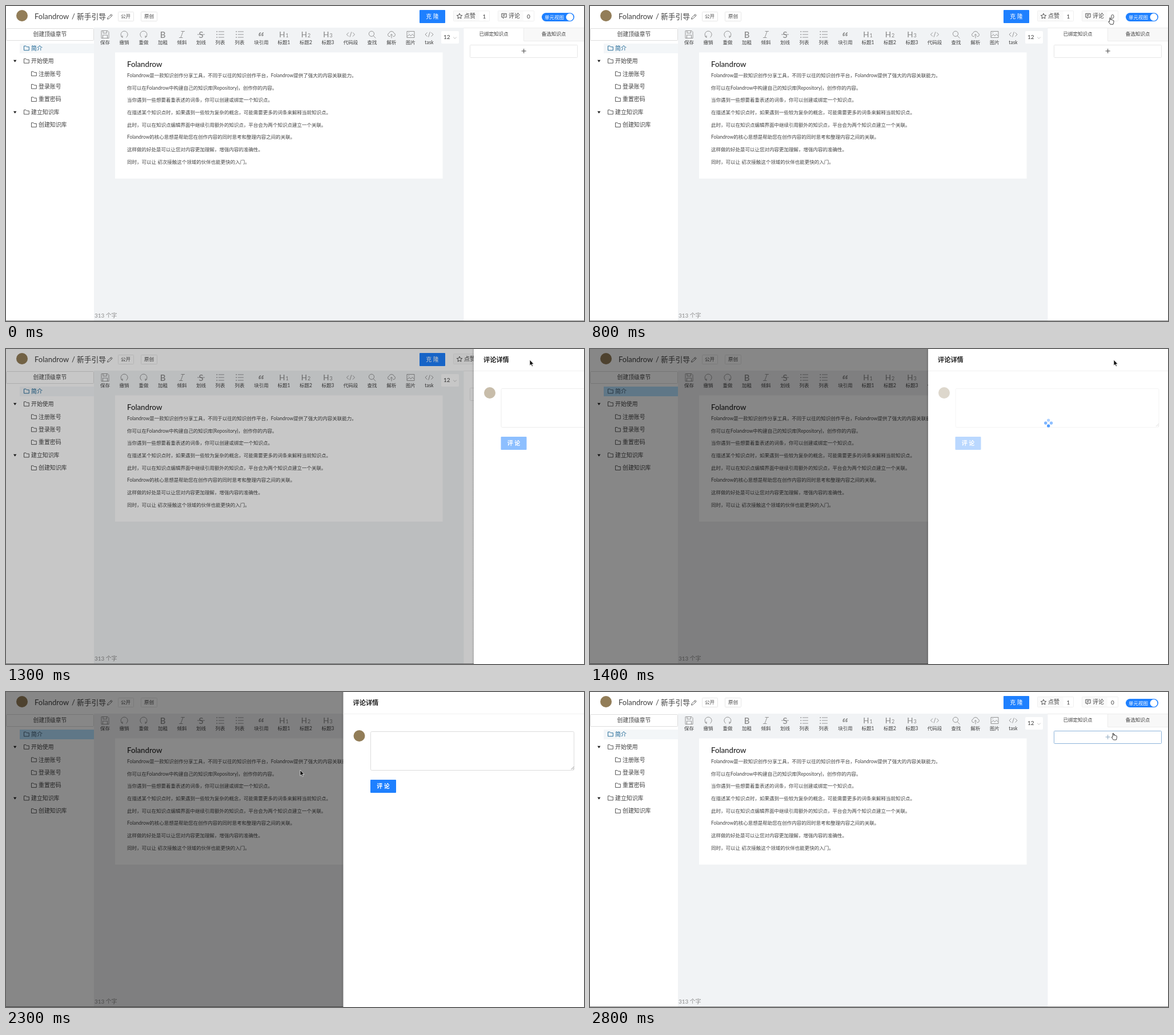
Write an HTML page that moves like this. It is 1012 by 553 pixels and loops after 2.9 s.

```html
<!DOCTYPE html>
<html>
<head>
<meta charset="utf-8">
<title>Comment drawer</title>
<style>
  html, body { margin: 0; width: 100%; height: 100%; overflow: hidden; background: #fff; }
  svg { display: block; width: 100%; height: 100%; }
  text { font-family: Lato, "Noto Sans CJK SC", "Noto Sans CJK", sans-serif; white-space: pre; }
  .icon { fill: none; stroke: #858585; stroke-width: .85; }
  .folder { fill: none; stroke: #444; stroke-width: .9; }
</style>
</head>
<body>
<svg id="stage" viewBox="0 0 1012 553"></svg>
<script>
const NS = 'http://www.w3.org/2000/svg';
const stage = document.getElementById('stage');
const BLUE = '#1e80ff', INK = '#3f3f3f', EDGE = '#e6e6e6', CREST = '#927d58';
const BRAND = 'Folandrow';
let layer = stage;

function add(tag, attrs, content) {
  const node = document.createElementNS(NS, tag);
  for (const key in attrs) node.setAttribute(key, attrs[key]);
  if (content) node.textContent = content;
  layer.appendChild(node);
  return node;
}
const rect = (x, y, right, bottom, fill, more) =>
  add('rect', { x, y, width: right - x, height: bottom - y, fill, ...more });
const box = (x, y, right, bottom, fill = '#fff', stroke = EDGE, rx = 1) =>
  rect(x + .5, y + .5, right - .5, bottom - .5, fill, { stroke, rx });
const circle = (cx, cy, r, fill, more) => add('circle', { cx, cy, r, fill, ...more });
// y is the optical middle of the line
const text = (x, y, str, size = 8.5, fill = INK, more) =>
  add('text', { x, y: y + size * .37, 'font-size': size, fill, ...more }, str);
const label = (x, y, str, size, fill, more) =>
  text(x, y, str, size, fill, { 'text-anchor': 'middle', ...more });
const icon = (x, y, d, more) =>
  add('path', { class: 'icon', d, transform: `translate(${x} ${y})`, ...more });
function group(attrs, build) {
  const parent = layer, node = add('g', attrs);
  layer = node;
  build();
  layer = parent;
  return node;
}

function header() {
  circle(28, 17, 10, CREST);
  text(50, 18, BRAND, 13);
  text(115, 18, '/', 13);
  text(124, 18, '新手引导', 12.75);
  icon(182, 18.5, 'M-4.5 4.5l.7-2.6 6-6 2 2-6 6zM.8-2.7l2 2', { style: 'stroke:#444' });
  box(196, 10, 224, 27);
  label(209.5, 18, '公开');
  box(236, 10, 265, 27);
  label(250.5, 18, '原创');
  rect(724, 7, 769, 30, BLUE, { rx: 1 });
  label(746.5, 18.5, '克 隆', 10, '#fff', { 'font-weight': 500 });

  box(783, 8, 847, 27, '#fafafa', '#efefef');
  rect(829, 9, 846, 26, '#fff');
  let star = '';
  for (let i = 0; i < 10; i++) {
    const r = i % 2 ? 2.3 : 5, a = i * Math.PI / 5;
    star += (i ? 'L' : 'M') + (r * Math.sin(a)).toFixed(2) + ' ' + (-r * Math.cos(a)).toFixed(2);
  }
  icon(794, 18, star + 'Z', { style: 'stroke:#333' });
  text(802, 17.5, '点赞', 10);
  label(837.5, 18, '1', 10);

  box(861, 8, 925, 27, '#fafafa', '#efefef');
  rect(906, 9, 924, 26, '#fff');
  icon(872, 17, 'M-4.2-3.7H4.2V2.7H.5L-1.5 4.7V2.7H-4.2ZM-2.2-1.6H2.2M-2.2.5H1', { style: 'stroke:#333' });
  text(880, 17.5, '评论', 10);
  label(915, 18, '0', 10);

  rect(938, 12, 995, 27, BLUE, { rx: 7.5 });
  text(943, 19.5, '单元视图', 8.5, '#fff');
  circle(987, 19.5, 6.4, '#fff');
}

let chosenRow, chosenText, chosenFolder;
function sidebar() {
  box(0, 39, 154, 61, '#fff', '#dedede');
  label(77, 49.5, '创建顶级章节', 9.8);
  chosenRow = rect(24, 66, 154, 83);
  const rows = [
    [0, '简介'], [0, '开始使用', 1], [1, '注册账号'], [1, '登录账号'],
    [1, '重置密码'], [0, '建立知识库', 1], [1, '创建知识库']
  ];
  rows.forEach(([depth, name, open], i) => {
    const y = 74 + i * 22.45, x = 31 + depth * 13;
    if (open) add('path', { d: `M13 ${y - 1.6}h5.4l-2.7 4z`, fill: '#222' });
    const folder = add('path', { class: 'folder', d: `M${x + .5} ${y - 3.8}h3.4l1.4 1.6h4v6H${x + .5}z` });
    const caption = text(x + 13, y, name, 9.9);
    if (!i) [chosenFolder, chosenText] = [folder, caption];
  });
}

function toolbar() {
  const y = 50;
  const glyph = (x, str, size = 14, more) => label(x, y, str, size, '#858585', more);
  const code = x => icon(x, y, 'M-3.5-3.5L-7 0-3.5 3.5M3.5-3.5L7 0 3.5 3.5M1.4-4.5L-1.4 4.5');
  const turn = (x, flip) => icon(x, y,
    'M-3 5.2A6 6 0 1 1 3.2 5.2M-5.8 3.2L-2.8 5.3-3.2 1.8', { transform: `translate(${x} ${y}) scale(${flip} 1)` });
  const list = x => {
    icon(x, y, 'M-3-5H7M-3 0H7M-3 5H7');
    icon(x, y, 'M-6.5-5h1.6M-6.5 0h1.6M-6.5 5h1.6', { style: 'stroke-width:1.5' });
  };
  const heading = n => x => {
    glyph(x - 3, 'H', 13.5);
    label(x + 5.5, y + 2, n, 9, '#858585');
  };
  const tools = [
    [173.5, '保存', x => icon(x, y, 'M-6-6.5H4.5L6.5-4.5V6.5H-6.5V-6.5ZM-3.5-6.5V-2.5H3V-6.5M-4 6.5V1H4V6.5')],
    [207, '撤销', x => turn(x, 1)],
    [241, '重做', x => turn(x, -1)],
    [274.5, '加粗', x => glyph(x, 'B', 15, { 'font-weight': 500 })],
    [308, '倾斜', x => icon(x, y, 'M-1.5-5.5H5M-5 5.5H1.5M2-5.5L-2 5.5')],
    [341.5, '划线', x => { glyph(x, 'S', 15); icon(x, y, 'M-6.5 0H6.5'); }],
    [375, '列表', list],
    [409, '列表', list],
    [447, '块引用', x => icon(x, y, 'M-.8-3C-3-2.5-4-1-4 1a1.2 1.2 0 1 0 1.2-1.2M4-3C1.8-2.5.8-1 .8 1A1.2 1.2 0 1 0 2-.2', { style: 'stroke-width:1.3' })],
    [486.5, '标题1', heading('1')],
    [525, '标题2', heading('2')],
    [563.5, '标题3', heading('3')],
    [603.5, '代码段', code],
    [641, '查找', x => icon(x, y, 'M3.6-1.2A4.6 4.6 0 1 1-5.6-1.2 4.6 4.6 0 1 1 3.6-1.2M2.2 2.3L6.3 6.5')],
    [675, '解析', x => icon(x, y, 'M-2.5 3.5H-4A3 3 0 0 1-4.4-2.3 4.6 4.6 0 0 1 4.4-2.3 3 3 0 0 1 4 3.5H2.5M0 6.5V-.5M-2.2 1.7L0-.5 2.2 1.7')],
    [708.5, '图片', x => icon(x, y, 'M-6.5-5.5H6.5V5.5H-6.5ZM-6 3.5L-2.5 0 .5 2.5 3-.5 6 2.5M-4-3h1.5')],
    [741, 'task', code]
  ];
  for (const [x, name, draw] of tools) {
    draw(x);
    label(x, 63.5, name);
  }
  rect(762, 44, 793, 66, '#fff', { rx: 2 });
  text(766, 54.5, '12', 10);
  icon(786, 56, 'M-2.8-1.4L0 1.4 2.8-1.4', { style: 'stroke:#b5b5b5' });
}

function page() {
  rect(191, 81.5, 764.5, 303, '#fff');
  text(212, 102, BRAND, 13.2, '#222', { 'font-weight': 500 });
  [
    BRAND + '是一款知识创作分享工具,不同于以往的知识创作平台,' + BRAND + '提供了强大的内容关联能力。',
    '你可以在' + BRAND + '中构建自己的知识库(Repository),创作你的内容。',
    '当你遇到一些想要着重表述的词条,你可以创建或绑定一个知识点。',
    '在描述某个知识点时,如果遇到一些较为复杂的概念,可能需要更多的词条来解释当前知识点。',
    '此时,可以在知识点编辑界面中继续引用额外的知识点,平台会为两个知识点建立一个关联。',
    BRAND + '的核心思想是帮助您在创作内容的同时思考和整理内容之间的关联。',
    '这样做的好处是可以让您对内容更加理解,增强内容的准确性。',
    '同时,可以让 初次接触这个领域的伙伴也能更快的入门。'
  ].forEach((line, i) => text(212, 122 + i * 21.65, line.replace(/,/g, '\uff0c'), 8.5, '#444'));
  text(155, 543, '313 个字', 9.9, '#8a8a8a');
}

let plusBox, plusSign;
function sidePanel() {
  rect(906, 39, 1012, 61, '#f8f8f8');
  add('path', { d: 'M906.5 39V61.5H1012M801 38.5H1012', fill: 'none', stroke: '#ececec' });
  label(854, 49, '已绑定知识点');
  label(959, 49, '备选知识点');
  plusBox = box(812, 68, 1001, 91);
  plusSign = add('path', { d: 'M902.7 79h8M906.7 75v8' });
}

let content, spinner;
function drawerParts() {
  rect(-4, 0, 0, 553, 'url(#shade)');
  rect(0, 0, 430, 553, '#fff');
  text(17, 18.5, '评论详情', 11.2, '#222', { 'font-weight': 700 });
  rect(0, 38, 430, 39, '#f0f0f0');
  content = group({}, () => {
    circle(28, 77, 10, CREST);
    box(47.5, 69, 404.5, 138, '#fff', '#dcdcdc', 2);
    add('path', { d: 'M399 136l5-5M402 136l2-2', stroke: '#777', 'stroke-width': .8 });
    rect(47.5, 154, 92.5, 177, BLUE, { rx: 1 });
    label(70, 165.5, '评 论', 10, '#fff', { 'font-weight': 700 });
  });
  spinner = group({}, () => {
    [.4, .55, .85, .65].forEach((opacity, i) =>
      circle(210.7 + 4.9 * Math.sin(i * Math.PI / 2), 130 - 4.9 * Math.cos(i * Math.PI / 2), 2.7, BLUE, { opacity }));
  });
}

add('defs', {}).innerHTML =
  '<linearGradient id="shade"><stop offset="0" stop-opacity="0"/><stop offset="1" stop-opacity=".12"/></linearGradient>';
rect(0, 0, 1012, 553, '#fff');
const canvas = rect(154, 38, 801.5, 553);
header();
sidebar();
toolbar();
page();
sidePanel();
rect(0, 552, 1012, 553, '#8c8c8c');
const mask = rect(0, 0, 1012, 553, '#000');
const drawer = group({}, drawerParts);
const pointers = {
  arrow: add('path', { d: 'M0 0V10.2L2.3 8.1 3.9 11.6 5.5 10.9 4 7.5H7.1Z', fill: '#111', stroke: '#fff', 'stroke-width': .7 }),
  hand: add('path', {
    d: 'M-.9 6.8V.8Q0-.6 .9.8V4.2Q2-.1 2.9 4.5 3.9 3.3 4.7 4.9 6 4.2 6.4 5.8V8.6L5.4 12H.4L-2.8 7.6Q-2.6 6-.9 7.4Z',
    fill: '#fff', stroke: '#222', 'stroke-width': .85, 'stroke-linejoin': 'round'
  })
};

// time, tip x, tip y, shape
const path = [
  [400, 901, 21, 'hand'], [900, 913, 20, 'hand'], [1000, 917, 19, 'arrow'], [1900, 917, 19, 'arrow'],
  [2300, 515, 137, 'arrow'], [2600, 515, 137, 'arrow'], [2800, 916, 72, 'hand']
];
// time, drawer x, mask, content opacity, spinner opacity, row shown as selected
const states = [
  [0, 1020, 0, 0, 0, 0], [1000, 1020, 0, 0, 0, 1], [1300, 819, .22, .5, 0, 0],
  [1400, 592, .47, .3, .9, 1], [1500, 590.5, .47, .3, .9, 1], [1600, 590.5, .47, .7, .3, 1],
  [1700, 590.5, .47, 1, 0, 1], [2400, 800, .22, 1, 0, 0], [2500, 1020, 0, 1, 0, 0]
];
const LOOP = 2900, STEP = 100;
const set = (node, name, value) => node.setAttribute(name, value);

function movePointer(t) {
  const i = path.findLastIndex(key => key[0] <= t);
  for (const name in pointers)
    set(pointers[name], 'visibility', i >= 0 && path[i][3] === name ? 'visible' : 'hidden');
  if (i < 0) return;
  const from = path[i], to = path[i + 1] || from;
  const k = to === from ? 0 : (t - from[0]) / (to[0] - from[0]);
  const at = n => from[n] + (to[n] - from[n]) * k;
  set(pointers[from[3]], 'transform', `translate(${at(1)} ${at(2)})`);
}

function render(now) {
  const t = Math.floor(now % LOOP / STEP) * STEP;
  const [, x, dim, body, spin, selected] = states.findLast(state => state[0] <= t);
  const hover = t >= 2800;
  set(drawer, 'transform', `translate(${x} 0)`);
  set(mask, 'opacity', dim);
  set(content, 'opacity', body);
  set(spinner, 'opacity', spin);
  set(spinner, 'transform', `rotate(${(t - 1400) * .3} 210.7 130)`);
  set(canvas, 'fill', selected ? '#efeff1' : '#f1f3f5');
  set(chosenRow, 'fill', selected ? '#b2e0ff' : '#f3f6f8');
  set(chosenText, 'fill', selected ? '#3b5468' : '#125f90');
  chosenFolder.style.stroke = selected ? '#3b5468' : '#125f90';
  set(plusBox, 'stroke', hover ? '#8db4da' : EDGE);
  set(plusSign, 'stroke', hover ? '#8aa5bd' : '#444');
  movePointer(t);
}

const start = performance.now();
function tick() {
  render(performance.now() - start);
  requestAnimationFrame(tick);
}
tick();
</script>
</body>
</html>
```
